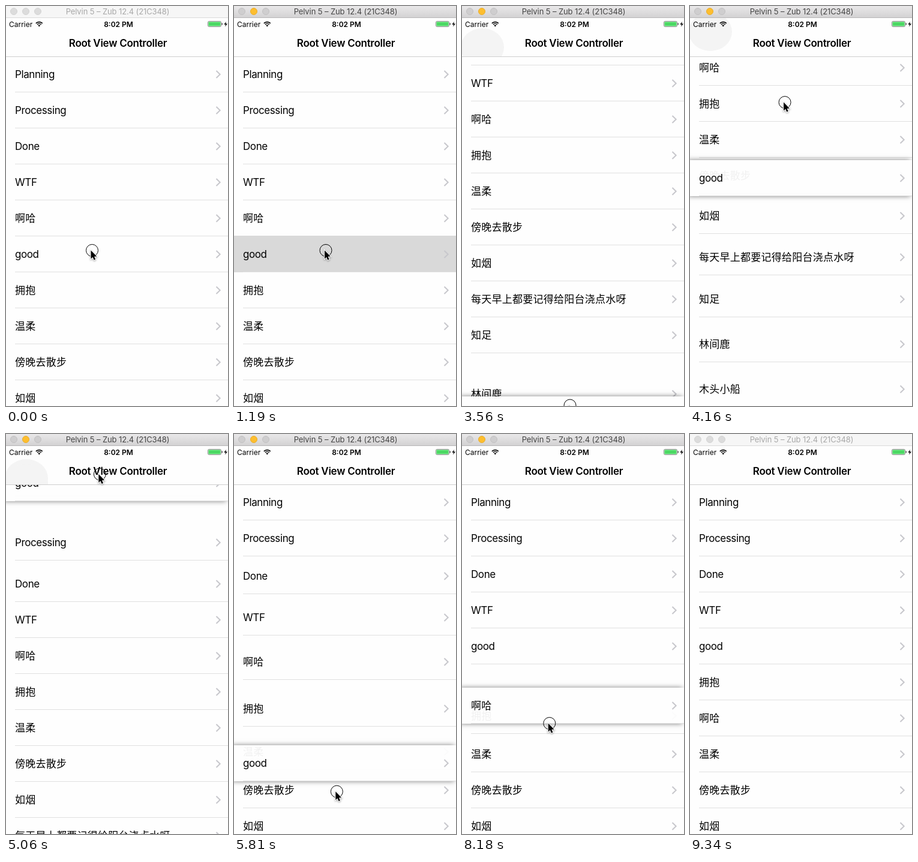
Animation of 370 by 667 pixels, one loop 9.44 s. Source, as an HTML page with a canvas:

```html
<!DOCTYPE html>
<html lang="zh-CN">
<head>
<meta charset="utf-8">
<style>
  html, body { margin: 0; width: 100%; height: 100%; overflow: hidden; background: #fefefe; }
  canvas { display: block; }
</style>
</head>
<body>
<canvas id="stage" width="370" height="667"></canvas>
<script>
const ctx = document.getElementById('stage').getContext('2d');
const W = 370, H = 667, LOOP = 9440, STEP = 148.6, BG = '#fefefe';
const TOP = 114, ROW = 60, MAX_SCROLL = 257, LAG = 0.6;
const FONT = 'Inter, "Noto Sans CJK SC", "Noto Sans CJK", sans-serif';

const names = ['Planning', 'Processing', 'Done', 'WTF', '啊哈', '拥抱', '温柔', '傍晚去散步', '如烟',
  '每天早上都要记得给阳台浇点水呀', '知足', '林间鹿', '木头小船'];
const withGood = names.map((n, i) => i === 4 ? 'good' : n);

// grab: where the cell's middle hangs below the pointer. Times are in steps.
const drags = [
  { name: 'good', others: names, grab: 15, press: 8, lift: 11, drop: 45 },
  { name: '啊哈', others: withGood, grab: -19, press: 51, lift: 53, drop: 58 }
];

// Stops of the pointer: [step, x, y], eased from one to the next.
const stops = [
  [0, 143.5, 407.5], [4, 153, 407.5], [10.6, 153, 407.5], [13, 157, 355], [14.25, 160, 355],
  [15.65, 175.5, 583], [20, 180, 666], [24.85, 180, 666], [29.05, 154, 67], [34.8, 156.5, 67],
  [39.6, 172, 620], [43.3, 177, 331], [44.4, 178, 331], [46.9, 201.5, 555], [47, 201.5, 555],
  [49, 141, 433], [52.4, 141, 433], [55.4, 146, 485], [57, 146, 485], [61, 195, 690]];

const clamp = u => Math.max(0, Math.min(1, u));
const smooth = u => u * u * (3 - 2 * u);

function pointerAt(k) {
  const i = Math.max(1, stops.findIndex(s => s[0] > k));
  const [k0, x0, y0] = stops[i - 1], [k1, x1, y1] = stops[i];
  const u = smooth(clamp((k - k0) / (k1 - k0)));
  return { x: x0 + (x1 - x0) * u, y: y0 + (y1 - y0) * u };
}

// The list speeds up towards its end, then back to the top.
function scrollAt(k) {
  return MAX_SCROLL * (clamp((k - 18) / 7.49) ** 2 - clamp((k - 26.79) / 7.92) ** 2);
}

const cellAt = (drag, k) => pointerAt(Math.min(k, drag.drop) - LAG).y + drag.grab;
const isAbove = (drag, j, k) => cellAt(drag, k) + scrollAt(k) < TOP + ROW * (j + 0.5);

// How far a row has eased into the slot below as the dragged cell passes it.
function rowShift(drag, j, k) {
  const n = 24;
  let sum = 0;
  for (let m = 0; m < n; m++) {
    const u = (m + 0.5) / n;
    if (isAbove(drag, j, k - 2 * u)) sum += 6 * u * (1 - u);
  }
  return Math.min(1, sum / n);
}

function rect(x, y, w, h, color) {
  ctx.fillStyle = color;
  ctx.fillRect(x, y, w, h);
}

function text(str, x, y, size, color = '#000', { weight = 400, align = 'left', spacing = 0 } = {}) {
  ctx.font = `${weight} ${size}px ${FONT}`;
  ctx.letterSpacing = spacing + 'px';
  ctx.textAlign = align;
  ctx.fillStyle = color;
  ctx.fillText(str, x, y);
}

function poly(points, close) {
  ctx.beginPath();
  points.forEach(([x, y]) => ctx.lineTo(x, y));
  if (close) ctx.closePath();
}

function fill(color) {
  ctx.fillStyle = color;
  ctx.fill();
}

function stroke(color, width = 1) {
  ctx.strokeStyle = color;
  ctx.lineWidth = width;
  ctx.stroke();
}

function circle(x, y, r) {
  ctx.beginPath();
  ctx.arc(x, y, r, 0, 7);
}

function row(name, y) {
  rect(15, y + 29, W, 1, '#e0e0e0');
  text(name, 15, y + 6, 17, '#000', { spacing: name.charCodeAt(0) > 255 ? 0.25 : -0.4 });
  poly([[350.5, y - 6], [356.7, y], [350.5, y + 6]]);
  stroke('#c7c7cc', 2);
}

function liftedRow(name, y) {
  ctx.save();
  ctx.beginPath();
  ctx.rect(0, y - 45, W, 15);
  ctx.rect(0, y + 30, W, 15);
  ctx.clip();
  ctx.shadowColor = 'rgba(0,0,0,.5)';
  ctx.shadowBlur = 8;
  ctx.shadowOffsetX = -3;
  rect(0, y - 30, W, 60, '#fff');
  ctx.restore();
  rect(0, y - 30, W, 60, 'rgba(254,254,254,.95)');
  row(name, y);
}

function table(k) {
  const drag = drags[k < 50 ? 0 : 1], scroll = scrollAt(k);
  const rows = drag.others.map((name, j) =>
    ({ name, y: Math.round(TOP + ROW * (j + rowShift(drag, j, k)) - scroll) }));
  rows.forEach(r => row(r.name, r.y));

  if (k >= drag.lift && k < drag.drop) {
    const y = Math.round(cellAt(drag, k));
    liftedRow(drag.name, y);
    return [...rows.map(r => r.y), y];
  }
  const slot = rows.filter((r, j) => !isAbove(drag, j, k)).length;
  const y = TOP + ROW * slot;
  if (k >= drag.press && k < drag.lift) rect(0, y - 31, W, 61, '#d9d9d9');
  row(drag.name, y);
  return rows.map(r => r.y);
}

function navBar(rowYs) {
  ctx.save();
  ctx.beginPath();
  ctx.rect(0, 20, W, 64);
  ctx.clip();
  rect(0, 20, W, 64, BG);
  // Text passing beneath the bar shows as a pale blur.
  for (const y of rowYs.filter(y => y > 25 && y < 86)) {
    ctx.beginPath();
    ctx.ellipse(34, y, 36, 32, 0, 0, 7);
    fill('#f4f4f4');
  }
  ctx.restore();
  rect(0, 84, W, 1, '#cfcfcf');
  text('Root View Controller', 186.5, 68, 17, '#000', { weight: 600, align: 'center', spacing: -0.27 });
}

function statusBar() {
  text('Carrier', 5, 34.5, 12);
  text('8:02 PM', 187.5, 34.5, 12, '#000', { weight: 600, align: 'center' });

  for (const r of [7.7, 4.8]) {
    ctx.beginPath();
    ctx.arc(55.3, 34.3, r, -Math.PI * 0.75, -Math.PI * 0.25);
    stroke('#000', 1.7);
  }
  poly([[55.3, 34.6], [53.2, 32.2], [55.3, 31.4], [57.4, 32.2]], true);
  fill('#000');

  ctx.beginPath();
  ctx.roundRect(336.5, 25.5, 22, 9, 2);
  stroke('rgba(0,0,0,.45)');
  rect(337.5, 26.5, 20, 7, '#4cd964');
  rect(359.5, 28.5, 1.5, 3, '#555');
  poly([[367, 26], [363.3, 30.8], [366, 30.8], [365, 34.5], [369, 29.4], [366.2, 29.4]], true);
  fill('#000');
}

function windowBar(active) {
  const g = ctx.createLinearGradient(0, 0, 0, 20);
  g.addColorStop(0, active ? '#e9e8e9' : '#f6f6f6');
  g.addColorStop(1, active ? '#d2d1d2' : '#f6f6f6');
  rect(0, 0, W, 20, g);
  rect(0, 19, W, 1, active ? '#b8b7b8' : '#dadada');
  for (let i = 0; i < 3; i++) {
    const lit = active && i === 1;
    circle(13 + 20 * i, 9, 5.5);
    fill(lit ? '#fdbe2f' : active ? '#cfcecf' : '#dcdcdc');
    stroke(lit ? '#e9ad2b' : active ? '#c2c1c2' : '#d3d3d3');
  }
  text('Pelvin 5 – Zub 12.4 (21C348)', 186, 14, 13, active ? '#444' : '#a8a8a8',
    { align: 'center', spacing: -0.1 });
}

function pointer(k) {
  const { x, y } = pointerAt(k);
  if (k < drags[0].drop || (k >= drags[1].press && k < drags[1].drop)) {
    circle(x, y, 10);
    stroke('#000');
  }
  ctx.save();
  ctx.translate(x - 2, y);
  poly([[0, 0], [0, 14], [3.1, 11.2], [5.2, 16], [7.6, 15], [5.6, 10.3], [9.8, 10.1]], true);
  ctx.shadowColor = 'rgba(0,0,0,.4)';
  ctx.shadowBlur = 3;
  ctx.shadowOffsetY = 1;
  stroke('#fff', 2);
  ctx.shadowColor = 'transparent';
  fill('#000');
  ctx.restore();
}

function draw(t) {
  const k = Math.floor((t % LOOP + 22) / STEP);
  rect(0, 0, W, H, BG);
  navBar(table(k));
  statusBar();
  windowBar(k >= 7 && k < 63);
  if (k < 61) pointer(k);
}

const start = performance.now();
function tick() {
  draw(performance.now() - start);
  requestAnimationFrame(tick);
}
tick();
</script>
</body>
</html>
```
